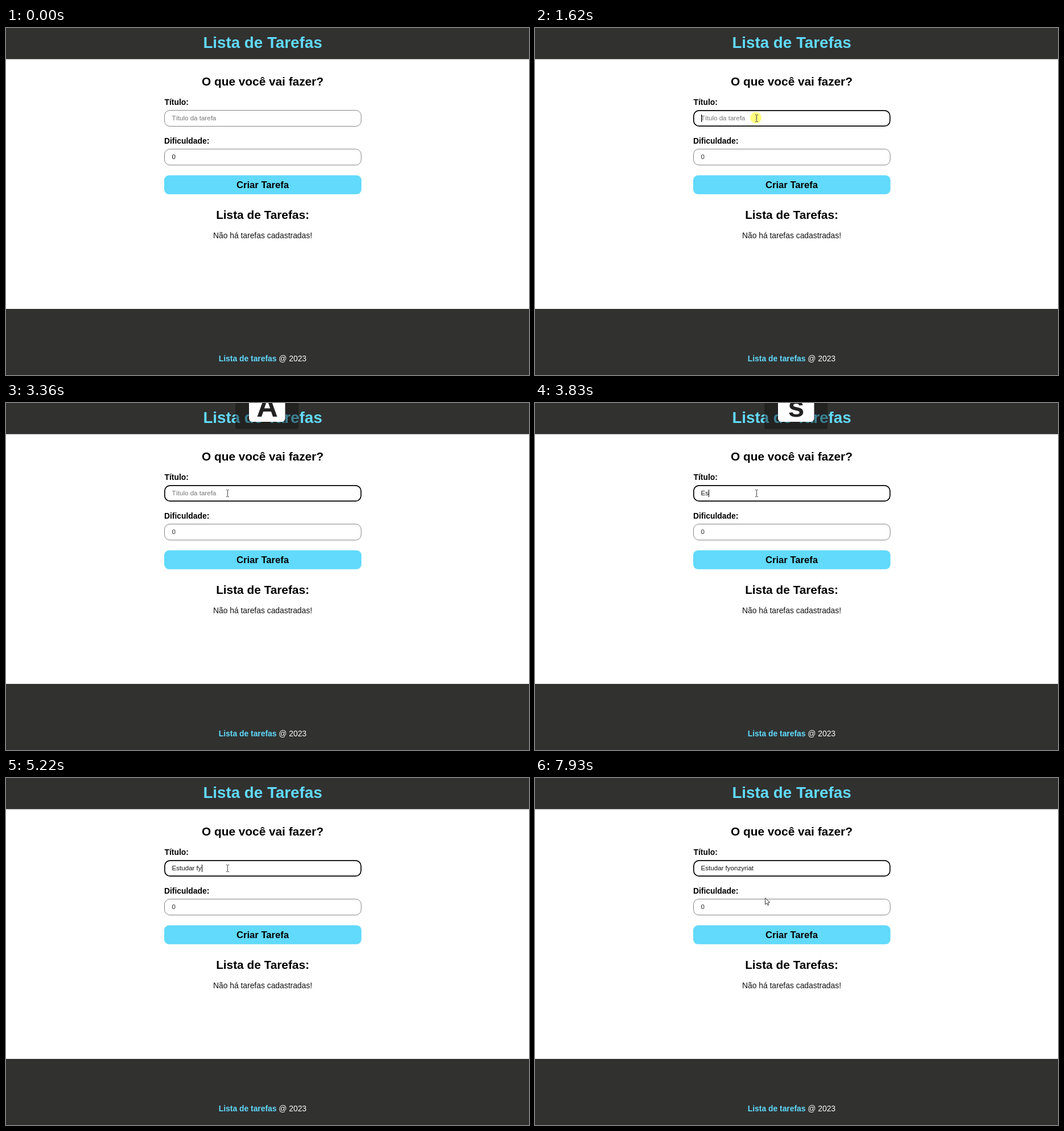
Recreate the animation shown at these times as an HTML page with a canvas. Size 919 px wide and 609 px high, loop 8 s.

```html
<!DOCTYPE html>
<html lang="pt">
<head>
<meta charset="utf-8">
<title>Lista de Tarefas</title>
<style>
  html, body { margin: 0; width: 100%; height: 100%; overflow: hidden; background: #fff; }
  canvas { display: block; }
</style>
</head>
<body>
<canvas id="stage" width="919" height="609"></canvas>
<script>
const ctx = document.getElementById('stage').getContext('2d');
const LOOP = 8000;
const CYAN = '#61dafb', DARK = '#313130', BLACK = '#000';
const CENTER = 451, LEFT = 278, WIDTH = 346.6;
const TASK = 'Estudar fyonzyriat';

// Moment at which each character of TASK appears
const keyTimes = [3630, 3830, 4030, 4360, 4490, 4620, 4750, 4950, 5020,
                  5220, 5420, 5550, 6010, 6220, 6330, 6610, 6810, 6940];
// Label on the pressed-key overlay; an empty label hides it
const overlayKeys = [[0, ''], [3360, 'A'], [3760, 'E'], [3830, 's'], [4360, 'u'],
                     [4490, 'd'], [4620, 'a'], [4820, 'r'], [4950, '']];
const caretSpans = [[1620, 2150], [2680, 3160], [3630, 7470]];

const within = (t, from, to) => t >= from && t < to;
const lerp = (a, b, u) => a + (b - a) * u;

// Progress 0..1 in even steps, as a screen recorder samples it
function stepped(t, from, to, steps) {
  const u = Math.floor((t - from + 8) / (to - from) * (steps - 1));
  return Math.min(1, Math.max(0, u / (steps - 1)));
}

function text(str, x, y, size, { color = BLACK, bold = false, align = 'left' } = {}) {
  ctx.font = `${bold ? 'bold ' : ''}${size}px "Liberation Sans", Arial, sans-serif`;
  ctx.fillStyle = color;
  ctx.textAlign = align;
  ctx.fillText(str, x, y);
  return ctx.measureText(str).width;
}

function heading(str, y, size, color = BLACK) {
  text(str, CENTER, y, size, { color, bold: true, align: 'center' });
}

function box(x, y, w, h, r) {
  ctx.beginPath();
  ctx.roundRect(x, y, w, h, r);
}

function field(y, focused) {
  const line = focused ? 1.7 : 1;
  box(LEFT + line / 2, y + line / 2, WIDTH - line, 29 - line, 9.5);
  ctx.lineWidth = line;
  ctx.strokeStyle = focused ? BLACK : '#858585';
  ctx.stroke();
}

function drawPage(t) {
  ctx.fillStyle = '#fff';
  ctx.fillRect(0, 0, 919, 609);
  ctx.fillStyle = DARK;
  ctx.fillRect(0, 0, 919, 54.7);
  ctx.fillRect(0, 493, 919, 116);

  heading('Lista de Tarefas', 35, 27.75, CYAN);
  heading('O que você vai fazer?', 101, 20.8);
  text('Título:', LEFT + .5, 135, 13.87, { bold: true });
  text('Dificuldade:', LEFT, 203, 13.87, { bold: true });

  field(144, t >= 1620);
  field(212, false);
  text('0', 291.6, 230, 11.56, { color: t < 1620 ? '#111' : '#333' });

  box(LEFT, 258.5, WIDTH, 33.2, 8.7);
  ctx.fillStyle = CYAN;
  ctx.fill();
  heading('Criar Tarefa', 280.7, 16.64);

  heading('Lista de Tarefas:', 335, 20.8);
  text('Não há tarefas cadastradas!', CENTER, 369, 13.87, { color: '#111', align: 'center' });

  const brandWidth = text('Lista de tarefas', 373.8, 585, 13.87, { color: CYAN, bold: true });
  text(' @ 2023', 373.8 + brandWidth, 585, 13.87, { color: '#fff' });
}

function drawTitleInput(t) {
  const typed = TASK.slice(0, keyTimes.filter(k => k <= t).length);
  let caretX = 291.6;
  if (typed) caretX += text(typed, 291.6, 162, 11.56, { color: '#111' });
  else text('Título da tarefa', 291.6, 162, 11.56, { color: '#757575' });

  if (caretSpans.some(([from, to]) => within(t, from, to))) {
    ctx.fillStyle = BLACK;
    ctx.fillRect(Math.round(caretX), 152, typed ? 1 : 1.3, 13);
  }
}

function drawOverlay(t) {
  const label = overlayKeys.filter(([start]) => start <= t).pop()[1];
  if (!label) return;
  box(403, -10, 111, 55.6, 4);
  ctx.fillStyle = 'rgba(17,17,17,.45)';
  ctx.fill();
  box(427, -30, 63.5, 63, 6);
  ctx.fillStyle = '#fff';
  ctx.fill();
  text(label, 459, 24, 52, { color: '#222', bold: true, align: 'center' });
}

function drawBeam(x, y) {
  ctx.fillStyle = '#444';
  ctx.fillRect(x, y - 5, 1, 11);
  ctx.fillRect(x - 2, y - 6, 2, 1);
  ctx.fillRect(x + 1, y - 6, 2, 1);
  ctx.fillRect(x - 2, y + 6, 2, 1);
  ctx.fillRect(x + 1, y + 6, 2, 1);
}

function drawArrow(x, y) {
  const outline = [[0, 0], [0, 11.5], [2.7, 9], [4.6, 13], [6.3, 12.2], [4.6, 8.4], [8, 8]];
  ctx.beginPath();
  for (const [dx, dy] of outline) ctx.lineTo(x + dx + .5, y + dy + .5);
  ctx.closePath();
  ctx.fillStyle = '#fff';
  ctx.fill();
  ctx.lineWidth = 1;
  ctx.strokeStyle = '#333';
  ctx.stroke();
}

function pointerAt(t) {
  if (t < 550) {
    const u = 1 - (1 - stepped(t, 70, 550, 8)) ** 2;
    return [lerp(858, 389, u), lerp(597, 152, u)];
  }
  if (t < 7800) return [389, lerp(152, 158, t < 820 ? 0 : (stepped(t, 820, 1020, 4) * 3 + 1) / 4)];
  const u = (stepped(t, 7800, 7930, 3) * 2 + 1) / 3;
  return [lerp(389, 404, u), lerp(158, 210, u * u)];
}

function drawPointer(t) {
  if (t < 70) return;
  const [x, y] = pointerAt(t).map(Math.round);
  if (within(t, 1550, 1680)) {
    ctx.beginPath();
    ctx.arc(388, 157.5, 10, 0, Math.PI * 2);
    ctx.fillStyle = 'rgba(255,255,0,.5)';
    ctx.fill();
  }
  const overField = within(x, LEFT, LEFT + WIDTH) && within(y, 144, 173);
  (overField ? drawBeam : drawArrow)(x, y);
}

function render() {
  const t = performance.now() % LOOP;
  drawPage(t);
  drawTitleInput(t);
  drawOverlay(t);
  drawPointer(t);
  requestAnimationFrame(render);
}
render();
</script>
</body>
</html>
```
